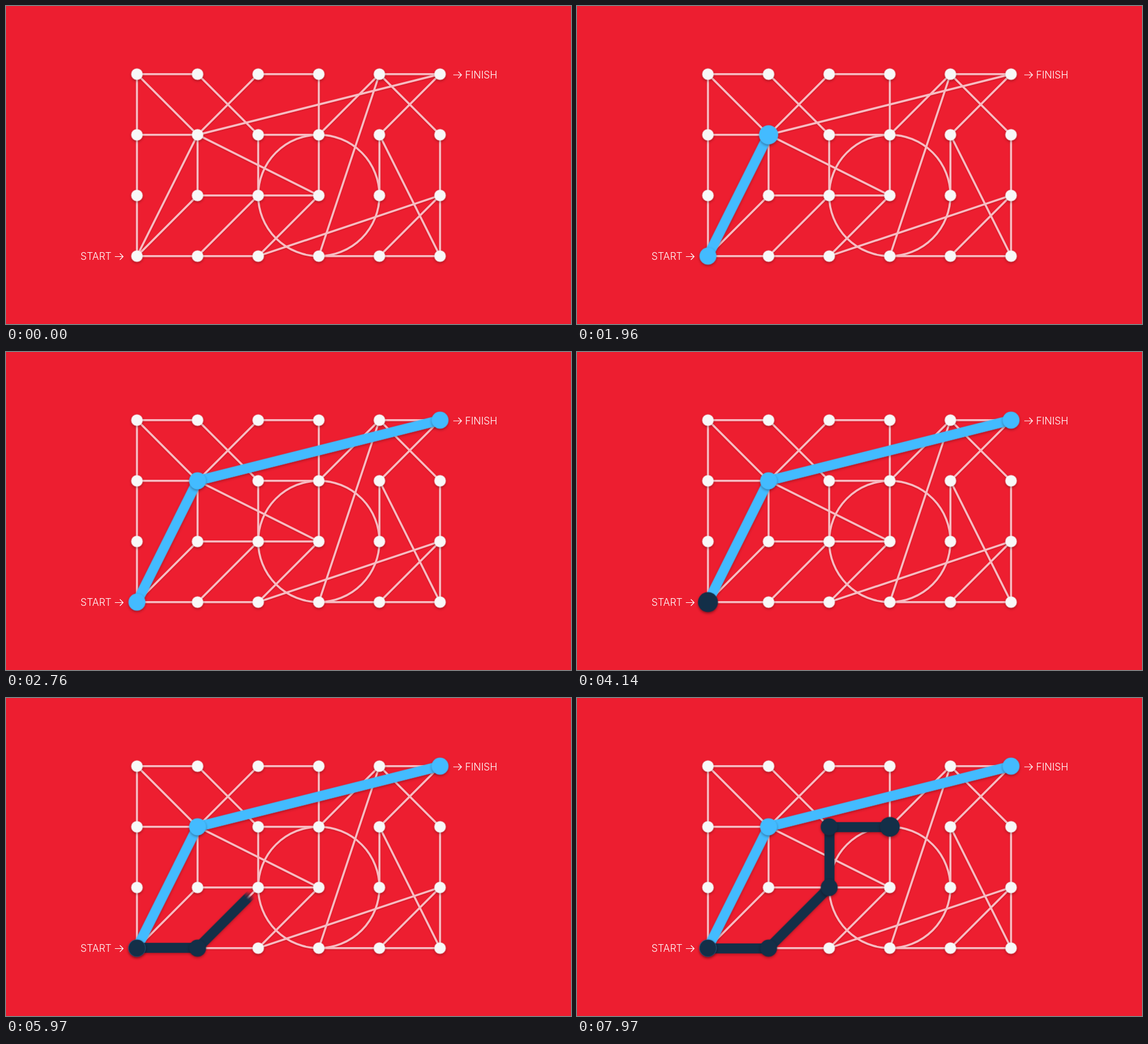
Recreate the animation shown at these times as an HTML page. Size 960x540 px, loop 8 s.

```html
<!DOCTYPE html>
<html lang="en">
<head>
<meta charset="utf-8">
<title>Two routes from start to finish</title>
<style>
  html, body { margin: 0; width: 100%; height: 100%; overflow: hidden; background: #ed1e30; }
  #stage { display: block; width: 960px; height: 540px; }

  .label { font: 300 16.9px Inter, Roboto, sans-serif; fill: #fff; }
  .arrow { fill: none; stroke: #fff; stroke-width: 1.2; }
  .edges { fill: none; stroke: #f8bcc2; filter: drop-shadow(0 1px 1px rgba(60, 0, 0, .22)); }
  .nodes { fill: #f8f8f8; filter: drop-shadow(0 2px 2px rgba(60, 0, 0, .36)); }
  .blue { fill: #43bbff; }
  .dark { fill: #132f48; }
  .route { filter: drop-shadow(0 2px 2px rgba(50, 0, 0, .32)); }
  .stop { filter: drop-shadow(0 2px 2px rgba(30, 0, 10, .36)); }

  /* Each bar slides along its own clipped track; each stop pops in. */
  .bar, .stop { animation: 8s linear infinite; }
  .b1 { animation-name: b1; }
  .b2 { animation-name: b2; }
  .d1 { animation-name: d1; }
  .d2 { animation-name: d2; }
  .d3 { animation-name: d3; }
  .d4 { animation-name: d4; }
  .p1 { animation-name: p1; }
  .p2 { animation-name: p2; }
  .p3 { animation-name: p3; }
  .q1 { animation-name: q1; }
  .q2 { animation-name: q2; }
  .q3 { animation-name: q3; }
  .q4 { animation-name: q4; }
  .q5 { animation-name: q5; }

  @keyframes b1 {
    0%, 19.49% { transform: translateX(-60px); }
    19.5% { transform: translateX(18px); }
    20.5% { transform: translateX(80px); }
    21.625% { transform: translateX(165px); }
    22.875%, 100% { transform: translateX(231px); }
  }
  @keyframes b2 {
    0%, 28.87% { transform: translateX(-60px); }
    28.875% { transform: translateX(4px); }
    29.5% { transform: translateX(66px); }
    30.125% { transform: translateX(167px); }
    30.75% { transform: translateX(290px); }
    31.375% { transform: translateX(385px); }
    32%, 100% { transform: translateX(425px); }
  }
  @keyframes d1 {
    0%, 65.49% { transform: translateX(-60px); }
    65.5% { transform: translateX(42px); }
    66.75%, 100% { transform: translateX(104px); }
  }
  @keyframes d2 {
    0%, 73.37% { transform: translateX(-60px); }
    73.375% { transform: translateX(40px); }
    74.625% { transform: translateX(118px); }
    75.875%, 100% { transform: translateX(146px); }
  }
  @keyframes d3 {
    0%, 87.74% { transform: translateX(-60px); }
    87.75% { transform: translateX(86px); }
    88.375%, 100% { transform: translateX(104px); }
  }
  @keyframes d4 {
    0%, 95.87% { transform: translateX(-60px); }
    95.875% { transform: translateX(45px); }
    97.125% { transform: translateX(92px); }
    98.375%, 100% { transform: translateX(104px); }
  }

  @keyframes p1 {
    0%, 8.24% { transform: scale(0); }
    8.25% { transform: scale(.8); }
    8.875% { transform: scale(1.18); }
    9.5% { transform: scale(1.12); }
    10.125%, 100% { transform: scale(1); }
  }
  @keyframes p2 {
    0%, 23.74% { transform: scale(0); }
    23.75% { transform: scale(.8); }
    24.625% { transform: scale(1.18); }
    25.5% { transform: scale(1.12); }
    26.375%, 100% { transform: scale(1); }
  }
  @keyframes p3 {
    0%, 32.62% { transform: scale(0); }
    32.625% { transform: scale(.8); }
    33.25% { transform: scale(1.18); }
    33.875% { transform: scale(1.12); }
    34.5%, 100% { transform: scale(1); }
  }
  @keyframes q1 {
    0%, 51.12% { transform: scale(0); }
    51.125% { transform: scale(.8); }
    51.75% { transform: scale(1.18); }
    52.375% { transform: scale(1.12); }
    53%, 100% { transform: scale(1); }
  }
  @keyframes q2 {
    0%, 66.74% { transform: scale(0); }
    66.75% { transform: scale(.85); }
    68% { transform: scale(1.17); }
    69.25%, 100% { transform: scale(1); }
  }
  @keyframes q3 {
    0%, 75.87% { transform: scale(0); }
    75.875% { transform: scale(.85); }
    77.125% { transform: scale(1.17); }
    78.375%, 100% { transform: scale(1); }
  }
  @keyframes q4 {
    0%, 88.37% { transform: scale(0); }
    88.375% { transform: scale(.85); }
    89% { transform: scale(1.17); }
    89.625%, 100% { transform: scale(1); }
  }
  @keyframes q5 {
    0%, 98.37% { transform: scale(0); }
    98.375% { transform: scale(.85); }
    99.625%, 100% { transform: scale(1.17); }
  }
</style>
</head>
<body>
<svg id="stage" viewBox="0 0 960 540" xmlns="http://www.w3.org/2000/svg">
  <defs>
    <linearGradient id="fade">
      <stop offset="0" stop-color="#fff"/>
      <stop offset="1" stop-color="#fff" stop-opacity="0"/>
    </linearGradient>
    <!-- Streaks for the blurred leading end of a bar -->
    <mask id="streaks" x="0" y="0" width="1" height="1" maskContentUnits="objectBoundingBox">
      <g fill="url(#fade)">
        <rect width=".8" height=".2"/>
        <rect y=".2" width="1" height=".22"/>
        <rect y=".42" width=".65" height=".18"/>
        <rect y=".6" width=".95" height=".22"/>
        <rect y=".82" width=".75" height=".18"/>
      </g>
    </mask>
    <g id="row">
      <circle r="9.8"/>
      <circle cx="103" r="9.8"/>
      <circle cx="206" r="9.8"/>
      <circle cx="309" r="9.8"/>
      <circle cx="412" r="9.8"/>
      <circle cx="515" r="9.8"/>
    </g>
    <rect id="solid" x="-430" width="430.3" height="17"/>
  </defs>

  <text class="label" x="126.6" y="431.3">START</text>
  <path class="arrow" d="M185 425.5h14m-5.5 -5.5l5.5 5.5l-5.5 5.5"/>
  <text class="label" x="780" y="122.9">FINISH</text>
  <path class="arrow" d="M760 117h14m-5.5 -5.5l5.5 5.5l-5.5 5.5"/>

  <g transform="translate(222.5 115.7)">
    <g class="edges">
      <g transform="scale(103)" stroke-width=".034">
        <path d="M0 0H1L2 1H3M2 0H3V2M4 0H5L4 1V2M0 0V3M0 0L1 1L2 0M0 1H1V2H3L1 1L0 3L1 2"/>
        <path d="M1 1L5 0M3 1L4 0L3 3M4 0L5 1V3L4 1M2 1V2L1 3M3 2L2 3L5 2L4 3M0 3H2M3 3H5"/>
        <circle cx="3" cy="2" r="1"/>
      </g>
    </g>

    <g class="route blue">
      <g transform="translate(0 309) rotate(-63.435)">
        <svg y="-8.5" width="230.3" height="17">
          <g class="bar b1"><use href="#solid"/><rect width="25" height="17" mask="url(#streaks)"/></g>
        </svg>
      </g>
      <g transform="translate(103 103) rotate(-14.036)">
        <svg y="-8.5" width="424.7" height="17">
          <g class="bar b2"><use href="#solid"/><rect width="46" height="17" mask="url(#streaks)"/></g>
        </svg>
      </g>
    </g>

    <g class="route dark">
      <g transform="translate(0 309)">
        <svg y="-8.5" width="103" height="17">
          <g class="bar d1"><use href="#solid"/><rect width="12" height="17" mask="url(#streaks)"/></g>
        </svg>
      </g>
      <g transform="translate(103 309) rotate(-45)">
        <svg y="-8.5" width="145.7" height="17">
          <g class="bar d2"><use href="#solid"/><rect width="14" height="17" mask="url(#streaks)"/></g>
        </svg>
      </g>
      <g transform="translate(206 206) rotate(-90)">
        <svg y="-8.5" width="103" height="17">
          <g class="bar d3"><use href="#solid"/></g>
        </svg>
      </g>
      <g transform="translate(206 103)">
        <svg y="-8.5" width="103" height="17">
          <g class="bar d4"><use href="#solid"/><rect width="12" height="17" mask="url(#streaks)"/></g>
        </svg>
      </g>
    </g>

    <g class="nodes">
      <use href="#row"/>
      <use href="#row" y="103"/>
      <use href="#row" y="206"/>
      <use href="#row" y="309"/>
    </g>

    <g class="blue">
      <g transform="translate(0 309)"><circle class="stop p1" r="14.4"/></g>
      <g transform="translate(103 103)"><circle class="stop p2" r="14.4"/></g>
      <g transform="translate(515 0)"><circle class="stop p3" r="14.4"/></g>
    </g>
    <g class="dark">
      <g transform="translate(0 309)"><circle class="stop q1" r="14.4"/></g>
      <g transform="translate(103 309)"><circle class="stop q2" r="14.4"/></g>
      <g transform="translate(206 206)"><circle class="stop q3" r="14.4"/></g>
      <g transform="translate(206 103)"><circle class="stop q4" r="14.4"/></g>
      <g transform="translate(309 103)"><circle class="stop q5" r="14.4"/></g>
    </g>
  </g>
</svg>
</body>
</html>
```
